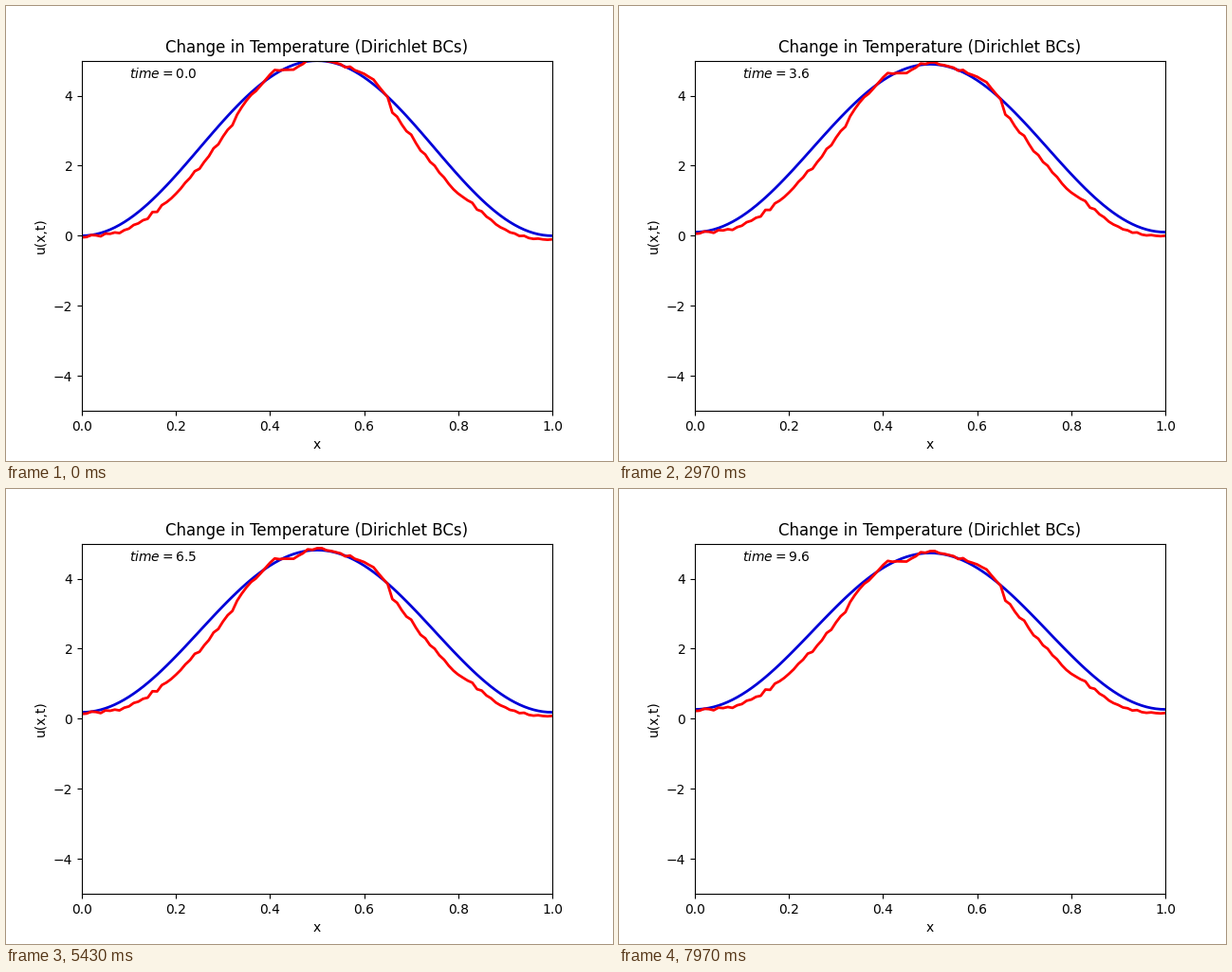
These frames come from a looping animation (640x480 px, 8000 ms). A matplotlib script:

```python
import numpy as np
import matplotlib.pyplot as plt
from matplotlib.animation import FuncAnimation

FRAMES = 240
LOOP_MS = 8000
DT = 0.04
PHASE = 1 / 3      # sample slightly inside each frame's time slot
ALPHA = 0.0003     # thermal diffusivity
NOISE = 0.025

x = np.linspace(0, 1, 101)

# Key points (x, gap) of the noisy curve relative to the smooth one
gap_points = [
    (0, -.03), (.05, -.06), (.10, -.28), (.15, -.41), (.20, -.51),
    (.26, -.55), (.32, -.37), (.34, -.17), (.41, .10), (.45, -.12),
    (.50, .06), (.55, 0), (.62, .11), (.65, -.02), (.66, -.30),
    (.73, -.54), (.80, -.50), (.85, -.36), (.90, -.28), (1, -.10)]
rng = np.random.default_rng(4)
gap = np.interp(x, *zip(*gap_points)) + rng.normal(0, NOISE, x.size)


def temperature(t):
    decay = np.exp(-ALPHA * (2 * np.pi) ** 2 * t)
    return 2.5 * (1 - decay * np.cos(2 * np.pi * x))


fig, ax = plt.subplots(figsize=(6.4, 4.8), dpi=100)
ax.set(xlim=(0, 1), ylim=(-5, 5), xlabel="x", ylabel="u(x,t)",
       title="Change in Temperature (Dirichlet BCs)")
smooth_line, = ax.plot([], [], color="#0000d8", lw=2)
noisy_line, = ax.plot([], [], color="#ff0000", lw=2)
clock = ax.text(0.1, 0.95, "", transform=ax.transAxes)


def update(i):
    t = (i + PHASE) * DT
    u = temperature(t)
    smooth_line.set_data(x, u)
    noisy_line.set_data(x, u + gap)
    clock.set_text(rf"$time = {t:.1f}$")
    return smooth_line, noisy_line, clock


anim = FuncAnimation(fig, update, frames=FRAMES, interval=LOOP_MS / FRAMES,
                     repeat=True, repeat_delay=0)
plt.show()
```
